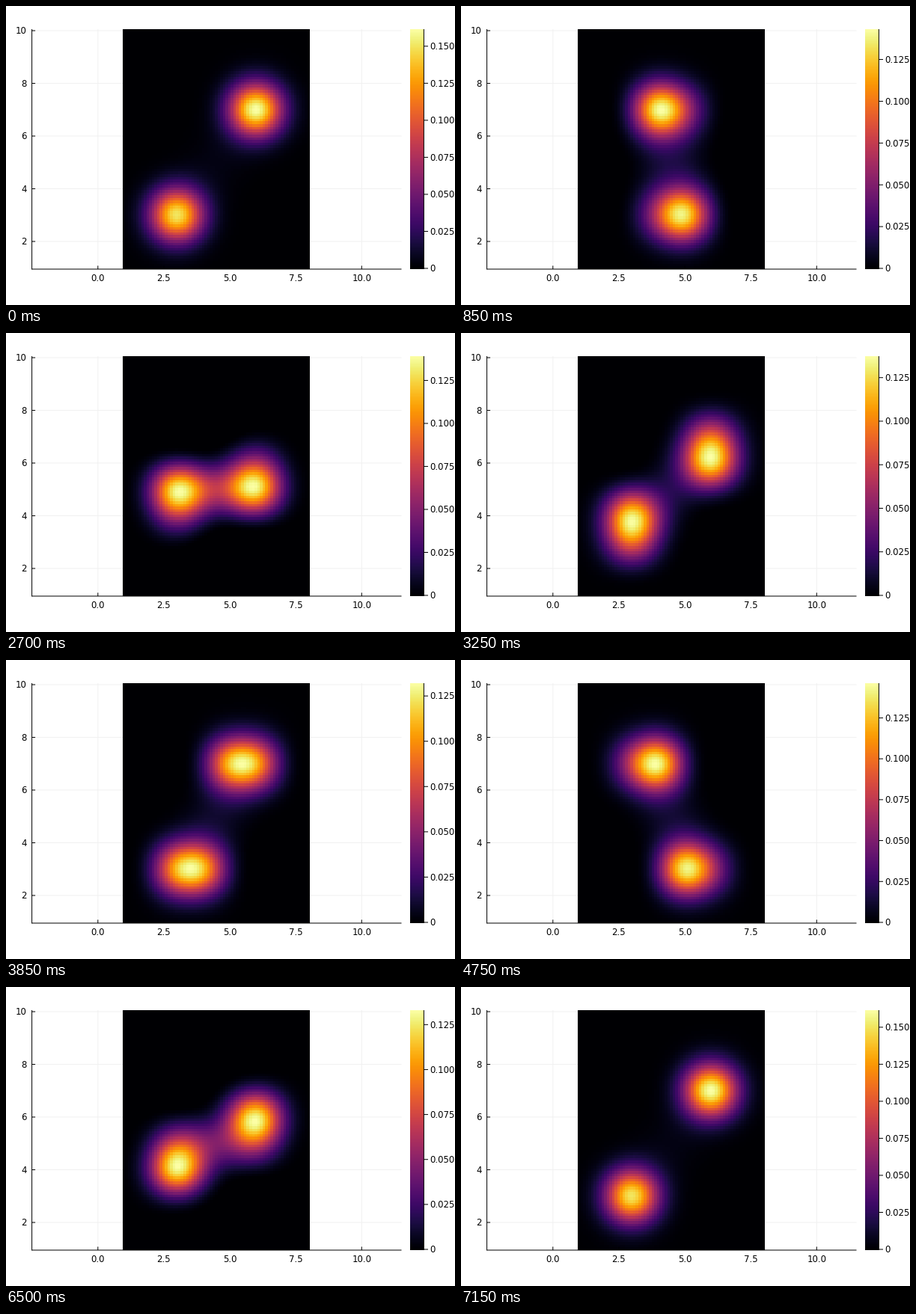
Animation, 600 px wide and 400 px high, one loop 7200 ms. Source, as a matplotlib script:

```python
import numpy as np
import matplotlib.pyplot as plt
from matplotlib.animation import FuncAnimation

W, H, DPI = 600, 400, 100
PX = 72 / DPI
UNIT = 35.25
LEFT, RIGHT, TOP, BOTTOM = 34.6, 528.5, 31, 352
HEAT_LEFT, HEAT_RIGHT = 156, 406
BAR_LEFT, BAR_RIGHT = 540, 558

NX, NY = 8, 10
SITE_X, SITE_Y = np.arange(1, NX + 1), np.arange(1, NY + 1)
GRID_X, GRID_Y = np.linspace(1, NX, 71), np.linspace(1, NY, 91)
SMEAR_X = np.exp(-(GRID_X[:, None] - SITE_X) ** 2)
SMEAR_Y = np.exp(-(GRID_Y[:, None] - SITE_Y) ** 2)


def to_x(v):
    return 122.8 + v * UNIT


def to_y(v):
    return BOTTOM - (v - 0.95) * UNIT


def build_path():
    """Both particles walk half of a rectangle, twice, in steps of 0.1."""
    first, second = [], []
    corners = [(3, 3), (6, 3), (6, 7), (3, 7), (3, 3)]
    for k in range(4):
        (x0, y0), (x1, y1) = corners[k], corners[k + 1]
        steps = 10 * (abs(x1 - x0) + abs(y1 - y0))
        for t in np.linspace(0, 1, steps + 1):
            x, y = x0 + (x1 - x0) * t, y0 + (y1 - y0) * t
            first.append((x, y))
            second.append((9 - x, 10 - y))
    return list(zip(first, second))


def share(pos, sites):
    """Smooth split between the two nearest sites, with a dip outside them."""
    d = np.abs(sites - pos)
    t = np.clip(1 - d, 0, 1)
    dip = np.clip(d - 1, 0, 1) * np.clip(2 - d, 0, 1) ** 2
    w = t * t * (3 - 2 * t) - 0.3 * dip
    return w / w.sum()


def density(p, q):
    gap = np.hypot(p[0] - q[0], p[1] - q[1])
    dist = [np.hypot(SITE_X - x, SITE_Y[:, None] - y) for x, y in (p, q)]
    # Charge shared along the line joining the particles, screened around it.
    strength = 7.5 * np.exp(-1.4 * gap)
    detour = dist[0] + dist[1] - gap
    charge = strength * (1.7 * np.exp(-3 * detour) - 0.7 * np.exp(-detour))
    main = 0.495 - 0.78 * strength
    for (x, y), r in zip((p, q), dist):
        cloud = np.outer(share(y, SITE_Y), share(x, SITE_X))
        dim = 0.07 * (2 * cloud.max() - 1) ** 2 * np.clip(4 - y, 0, 1)
        charge = charge + main * (1 - dim) * cloud + 0.006 * np.exp(-r)
    return np.maximum(SMEAR_Y @ charge @ SMEAR_X.T / np.pi, 0)


PATH = build_path()

plt.rcParams["font.family"] = "DejaVu Sans"
fig = plt.figure(figsize=(W / DPI, H / DPI), dpi=DPI, facecolor="white")
ax = fig.add_axes([0, 0, 1, 1])
ax.axis("off")


def line(x0, y0, x1, y1, color="black", z=4):
    return ax.plot([x0, x1], [y0, y1], color=color, lw=PX, zorder=z,
                   solid_capstyle="butt", snap=False)[0]


def label(x, y, s, ha):
    return ax.text(x, y + 4.3, s, ha=ha, va="baseline", fontsize=11.7 * PX)


for v in (0, 2.5, 5, 7.5, 10):
    x = to_x(v)
    line(x, TOP, x, BOTTOM, "#f1f1f1", 1)
    line(x, BOTTOM, x, BOTTOM - 4.5)
    label(x, 364, f"{v:.1f}", "center")
for v in (2, 4, 6, 8, 10):
    y = to_y(v)
    line(LEFT, y, RIGHT, y, "#f1f1f1", 1)
    line(LEFT, y, LEFT + 4.5, y)
    label(27.5, y, str(v), "right")
line(LEFT, TOP, LEFT, BOTTOM + 0.5)
line(LEFT, BOTTOM, RIGHT, BOTTOM)
line(BAR_RIGHT + 0.4, TOP, BAR_RIGHT + 0.4, BOTTOM)

heat = ax.imshow(density(*PATH[0]), cmap="inferno", origin="lower",
                 interpolation="nearest", aspect="auto", zorder=2,
                 extent=[HEAT_LEFT, HEAT_RIGHT, BOTTOM, TOP])
ax.imshow(np.linspace(1, 0, 256)[:, None], cmap="inferno", aspect="auto",
          interpolation="nearest", zorder=2,
          extent=[BAR_LEFT, BAR_RIGHT, BOTTOM, TOP])

LEVELS = [0.025 * k for k in range(8)]
ticks = [(line(BAR_RIGHT, 0, BAR_RIGHT + 6, 0),
          label(566, 0, f"{v:.3f}" if v else "0", "left")) for v in LEVELS]
ax.set_xlim(0, W)
ax.set_ylim(H, 0)


def update(i):
    field = density(*PATH[i])
    top = field.max()
    heat.set_data(field)
    heat.set_clim(0, top)
    for v, (mark, text) in zip(LEVELS, ticks):
        y = BOTTOM - 1 - (BOTTOM - 1 - TOP) * v / top
        mark.set_ydata([y, y])
        text.set_y(y + 4.3)
        mark.set_visible(v <= top)
        text.set_visible(v <= top)
    return heat,


anim = FuncAnimation(fig, update, frames=len(PATH), interval=50,
                     repeat=True, repeat_delay=0, blit=False)
plt.show()
```
